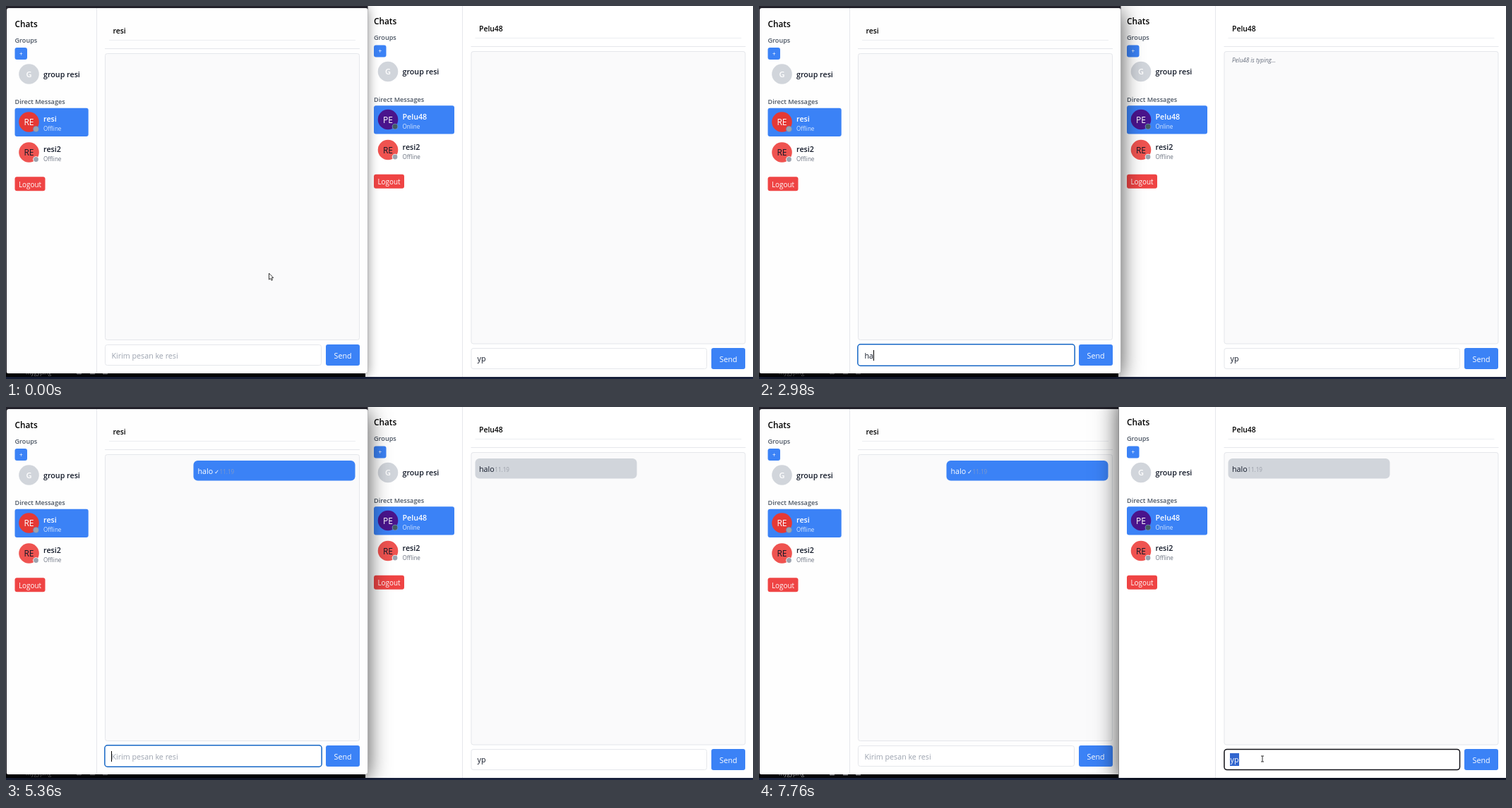
These frames come from a looping animation (1058x529 px, 8 s). An HTML page with a canvas:

```html
<!DOCTYPE html>
<html lang="id">
<head>
<meta charset="utf-8">
<title>Chats</title>
<style>
  html, body { margin: 0; width: 100%; height: 100%; overflow: hidden; background: #fff; }
  canvas { display: block; width: 1058px; height: 529px; }
</style>
</head>
<body>
<canvas id="stage"></canvas>
<script>
const W = 1058, H = 529, LOOP = 8000;
const BLUE = '#3b82f6', INK = '#111827', MUTED = '#6b7280', LINE = '#e5e7eb', SILVER = '#d1d5db';
const canvas = document.getElementById('stage');
const ctx = canvas.getContext('2d');
const ratio = window.devicePixelRatio || 1;
canvas.width = W * ratio;
canvas.height = H * ratio;

const people = {
  peer: 'resi', other: 'resi2', me: 'Pelu48', group: 'group resi'
};

// Moments of the story, in ms
const CLICK_LEFT = 1180, TYPING = 2980, SENT = 3610, SWITCH = 6940, CLICK_RIGHT = 7270;

const within = (t, from, to) => t >= from && t < to;
const ramp = (t, from, length) => Math.min(1, Math.max(0, (t - from) / length));

function fillBox(x, y, w, h, r, color) {
  ctx.beginPath();
  ctx.roundRect(x, y, w, h, r);
  ctx.fillStyle = color;
  ctx.fill();
}

function strokeBox(x, y, w, h, r, color, width = 1) {
  const d = width / 2;
  ctx.beginPath();
  ctx.roundRect(x + d, y + d, w - width, h - width, r);
  ctx.strokeStyle = color;
  ctx.lineWidth = width;
  ctx.stroke();
}

function rect(x, y, w, h, color) {
  ctx.fillStyle = color;
  ctx.fillRect(x, y, w, h);
}

function disc(x, y, r, color) {
  ctx.beginPath();
  ctx.arc(x, y, r, 0, Math.PI * 2);
  ctx.fillStyle = color;
  ctx.fill();
}

function text(str, x, y, size, color, style = '400', align = 'left') {
  ctx.font = `${style} ${size}px "Open Sans", "Noto Sans", sans-serif`;
  ctx.textAlign = align;
  ctx.fillStyle = color;
  ctx.fillText(str, x, y);
  return ctx.measureText(str).width;
}

function contact(y, c) {
  if (c.boxWidth) fillBox(12.5, y - 19.8, c.boxWidth, 40.2, 3, BLUE);
  disc(32.5, y, 14.3, c.color);
  text(c.name.slice(0, 2).toUpperCase(), 32.5, y + 4.5, 12, c.boxWidth ? '#fff' : INK, '400', 'center');
  disc(42.5, y + 10, 4.3, c.boxWidth ? '#6f8fc4' : '#fff');
  disc(42.5, y + 10, 3.4, c.dot);
  text(c.name, 53, y - 0.5, 10.7, c.boxWidth ? '#fff' : INK, '600');
  text(c.status, 53, y + 12.5, 8.1, c.boxWidth ? '#dbeafe' : MUTED);
}

// Sidebar in the left window's coordinates; the right window shifts it.
function sidebar(dx, dy, active) {
  ctx.save();
  ctx.translate(dx, dy);
  text('Chats', 12.5, 29.5, 11.8, '#000', '600');
  text('Groups', 12.5, 51.5, 9.1, '#4b5563', '600');
  fillBox(12.5, 59, 17.5, 17, 3, BLUE);
  text('+', 21.2, 70.8, 8.1, '#fff', '400', 'center');
  disc(32.5, 96.5, 14.3, SILVER);
  text('G', 32.5, 100.5, 11, '#fff', '600', 'center');
  text(people.group, 53, 100.7, 10.7, INK, '600');
  text('Direct Messages', 12.5, 139, 9.1, '#4b5563', '600');
  contact(164.5, active);
  contact(207.5, { name: people.other, status: 'Offline', color: '#ef5350', dot: '#9ca3af' });
  fillBox(12.5, 242.2, 43, 20, 3, '#ef4444');
  text('Logout', 34, 256.5, 9.9, '#fff', '400', 'center');
  ctx.restore();
}

function panel(x, y, w, h, title) {
  text(title, x + 11.5, y - 28, 10.4, '#000', '600');
  rect(x + 6, y - 19, w - 12, 1, '#eceef1');
  rect(x, y - 7, w, 1, LINE);
  fillBox(x, y, w, h, 3, '#fafafb');
  strokeBox(x, y, w, h, 3, LINE);
}

function inputRow(x, y, w, ring) {
  fillBox(x, y, w, 30, 3, '#fff');
  if (ring) strokeBox(x - ring.out, y - ring.out, w + 2 * ring.out, 30 + 2 * ring.out, 4, ring.color, 1.5);
  else strokeBox(x, y, w, 30, 3, LINE);
  fillBox(x + w + 6, y, 48, 30, 3, BLUE);
  text('Send', x + w + 30, y + 20, 10.7, '#fff', '400', 'center');
}

// The front window casts a shadow that deepens as it gains focus (lift 0 to 1).
function windowBase(x, y, w, h, r, front, lift, color) {
  ctx.save();
  if (front) {
    ctx.shadowColor = `rgba(0,0,0,${0.45 + 0.27 * lift})`;
    ctx.shadowBlur = (16 + 15 * lift) * ratio;
    ctx.shadowOffsetY = (3 + 4 * lift) * ratio;
  }
  fillBox(x, y, w, h, r, color);
  ctx.restore();
}

function draft(t) {
  if (!within(t, TYPING, SENT)) return '';
  return t < 3120 ? 'ha' : t < 3260 ? 'hal' : 'halo';
}

function caretOn(t) {
  return within(t, CLICK_LEFT, 1670) || within(t, 2230, 3740) || within(t, 4340, 4760) ||
         within(t, 5290, 5500) || within(t, 6110, SWITCH);
}

function leftWindow(t, front) {
  windowBase(0, 0, 512.5, 521, [0, 0, 4, 2], front, ramp(t, CLICK_LEFT, 250), '#23222b');
  fillBox(1, 3, 511.5, 518, [3, 3, 4, 2], '#fefefe');
  rect(128, 3, 1, 518, LINE);
  sidebar(0, 0, { name: people.peer, status: 'Offline', color: '#e53935', dot: '#9ca3af', boxWidth: 104.2 });
  panel(140, 67, 361, 407, people.peer);
  if (t >= SENT) {
    fillBox(265.5, 76, 229, 28.5, 6, BLUE);
    text('halo', 271.5, 95, 10.7, '#fff');
    ctx.font = '8.5px "DejaVu Sans", sans-serif';
    ctx.fillText('✓', 295, 95);
    text('11.19', 302.5, 95, 8.1, '#8099c8');
  }
  const focused = within(t, CLICK_LEFT, CLICK_RIGHT);
  inputRow(140, 480, 307, focused && { out: 0.9, color: '#1667c5' });
  const typed = draft(t);
  let end = 149.5;
  if (typed) end += text(typed, 149.5, 499.5, 10.7, INK);
  else text('Kirim pesan ke ' + people.peer, 149.5, 499.5, 10.7, '#9ca3af');
  if (focused && caretOn(t)) rect(Math.round(end) - (typed ? 0 : 1), 488, 1, 15, '#000');
}

function rightWindow(t, front) {
  windowBase(509, -20, 560, 546, 0, front, ramp(t, 7000, 250), '#fff');
  if (front) rect(509, 0, 1, 526, '#8b8b8d');
  rect(646, 0, 1, 526, LINE);
  sidebar(508.5, -3.5, { name: people.me, status: 'Online', color: '#4a148c', dot: '#435b62', boxWidth: 114 });
  panel(658.5, 64, 389, 415.5, people.me);
  if (within(t, TYPING, SENT)) {
    text(people.me + ' is typing...', 670, 79.5, 8.1, MUTED, 'italic 400');
  }
  if (t >= SENT) {
    fillBox(664.5, 73, 229, 28.5, 6, SILVER);
    text('halo', 670, 92, 10.7, INK);
    text('11.19', 692.3, 92, 8.1, '#9a9fa9');
  }
  const focused = t >= CLICK_RIGHT;
  inputRow(658.5, 485, 334.5, focused && { out: 0.3, color: '#111118' });
  if (focused) rect(667, 491, 13, 18, '#3266cf');
  text('yp', 667.5, 504, 10.7, focused ? '#fff' : INK);
}

function desktop() {
  rect(0, 0, W, H, '#050507');
  ctx.save();
  ctx.beginPath();
  ctx.rect(0, 521, 509, 5);
  ctx.clip();
  text('mygyping', 28, 523, 8, '#a0a0a4');
  [100, 119, 137].forEach(x => rect(x, 521, 7, 1.5, '#808084'));
  ctx.restore();
  rect(0, 526, W, 3, '#18213c');
}

// Pointer keys: time, x, y
const tracks = [
  [[0, 372.5, 379], [200, 372.5, 379], [900, 339, 499], [TYPING, 339, 499]],
  [[6110, 624, 451], [6310, 662, 458], [6380, 686.5, 465.5], [6660, 713, 499], [LOOP, 713, 499]]
];

function pointerAt(t) {
  for (const keys of tracks) {
    for (let i = 1; i < keys.length; i++) {
      const [t0, x0, y0] = keys[i - 1], [t1, x1, y1] = keys[i];
      if (!within(t, t0, t1)) continue;
      const p = ramp(t, t0, t1 - t0);
      const k = p * p * (3 - 2 * p);
      return [x0 + (x1 - x0) * k, y0 + (y1 - y0) * k];
    }
  }
  return null;
}

function ibeam(x, y) {
  ctx.save();
  ctx.translate(Math.round(x), Math.round(y));
  rect(-0.5, -4, 1, 8, '#333');
  rect(-2, -4.5, 4, 1, '#333');
  rect(-2, 3.5, 4, 1, '#333');
  ctx.restore();
}

function arrow(x, y) {
  const shape = [[0, 0], [0, 9], [2.1, 7.2], [3.5, 10.2], [5, 9.5], [3.7, 6.6], [6.2, 6.4]];
  ctx.beginPath();
  shape.forEach(([dx, dy]) => ctx.lineTo(x + dx, y + dy));
  ctx.closePath();
  ctx.fillStyle = '#fff';
  ctx.fill();
  ctx.strokeStyle = '#222';
  ctx.lineWidth = 0.9;
  ctx.stroke();
}

function pointer(t) {
  const at = pointerAt(t);
  if (!at) return;
  const [x, y] = at;
  const overInput = x < 509 ? y > 480 : y > 485;
  (overInput ? ibeam : arrow)(x, y);
}

function draw(t) {
  ctx.setTransform(ratio, 0, 0, ratio, 0, 0);
  desktop();
  if (t >= SWITCH) {
    leftWindow(t, false);
    rightWindow(t, true);
  } else {
    rightWindow(t, false);
    leftWindow(t, true);
  }
  pointer(t);
}

const start = performance.now();
function tick() {
  draw((performance.now() - start) % LOOP);
  requestAnimationFrame(tick);
}
tick();
</script>
</body>
</html>
```
